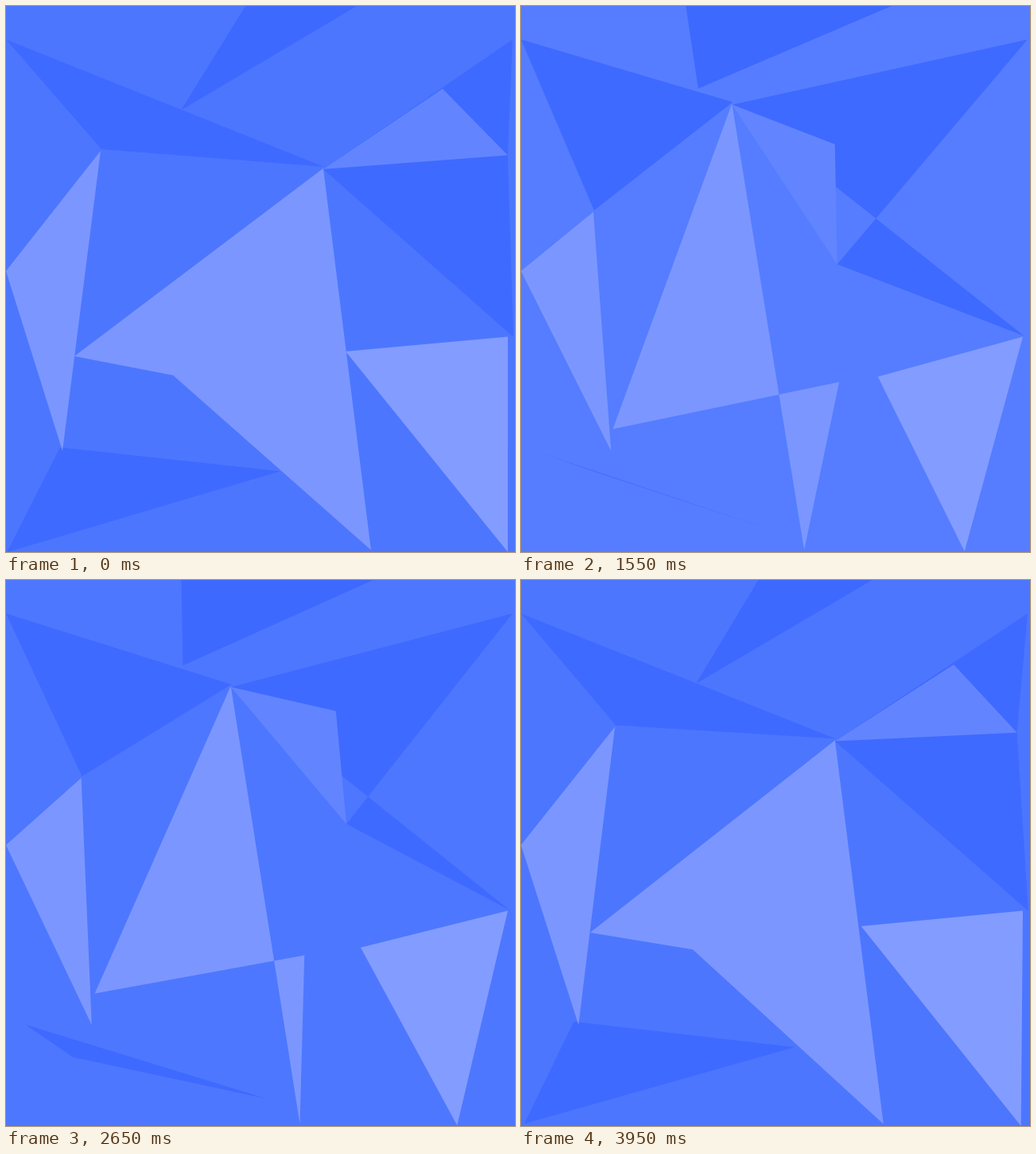
Write an HTML page with a canvas that moves like this. It is 640x686 px and loops after 4 s.

```html
<!DOCTYPE html>
<html lang="en">
<head>
<meta charset="utf-8">
<title>Shifting facets</title>
<style>
  html, body { margin: 0; width: 100%; height: 100%; overflow: hidden; background: #4d76ff; }
  canvas { display: block; }
</style>
</head>
<body>
<canvas id="stage" width="640" height="686"></canvas>
<script>
const LOOP = 4000;
const ctx = document.getElementById('stage').getContext('2d');
const mix = (a, b, u) => a + (b - a) * u;

function facet(color, ...corners) {
  ctx.beginPath();
  for (const p of corners) ctx.lineTo(p.x, p.y);
  ctx.fillStyle = color;
  ctx.fill();
}

// The backdrop brightens until 1600 ms and settles by 2800 ms.
function backdrop(t) {
  const glow = t < 1600 ? t / 1600 : Math.max(0, (2800 - t) / 1200);
  ctx.fillStyle = `rgb(${mix(77, 86, glow)}, ${mix(118, 125, glow)}, 255)`;
  ctx.fillRect(0, 0, 640, 686);
}

function draw(t) {
  // Every corner glides along a straight line, out and back once per loop.
  const u = 1 - Math.abs(1 - 2 * t / LOOP);
  const at = (x, y, dx = 0, dy = 0) => ({ x: x + dx * u, y: y + dy * u });
  const below = p => ({ x: p.x - 1, y: p.y + 2 });

  // Joints shared by neighbouring facets.
  const apex = at(400, 202, -172.5, -104.8);
  const hub = at(399, 205, -172, -104.4);
  const shoulder = at(120, 180, -36.2, 99);
  const elbow = at(631, 187.5, -301, 176.5);

  const roof = at(610, -100, 6, 47);
  const roofEdge = { x: mix(363, 150, u), y: roof.y };

  const dark = '#3f6aff', pale = '#7b97ff';
  backdrop(t);
  facet('#3d69ff', roofEdge, roof, at(220, 131, 3.6, -35));
  facet(dark, at(0, 42), apex, shoulder);
  facet(dark, hub, at(637, 42), elbow, at(638, 416, -7, -2));
  facet(dark, at(68, 554.5, -65, 6), at(345, 584.5, -24, 100), at(1, 686.5, 123, -129));
  facet('#6285ff', hub, at(549, 104, -199, 90), elbow);
  facet(pale, below(shoulder), at(0, 333), at(71, 559, 54.5));
  facet(pale, below(apex), at(459, 683.5, -132.7), at(210, 464, 245, 11), at(86, 440, 38, 118));
  facet('#839cff', at(427, 434, 28, 41), at(631, 415.5), at(631, 686, -94.5, -1));
}

const start = performance.now();
function tick() {
  draw((performance.now() - start) % LOOP);
  requestAnimationFrame(tick);
}
tick();
</script>
</body>
</html>
```
